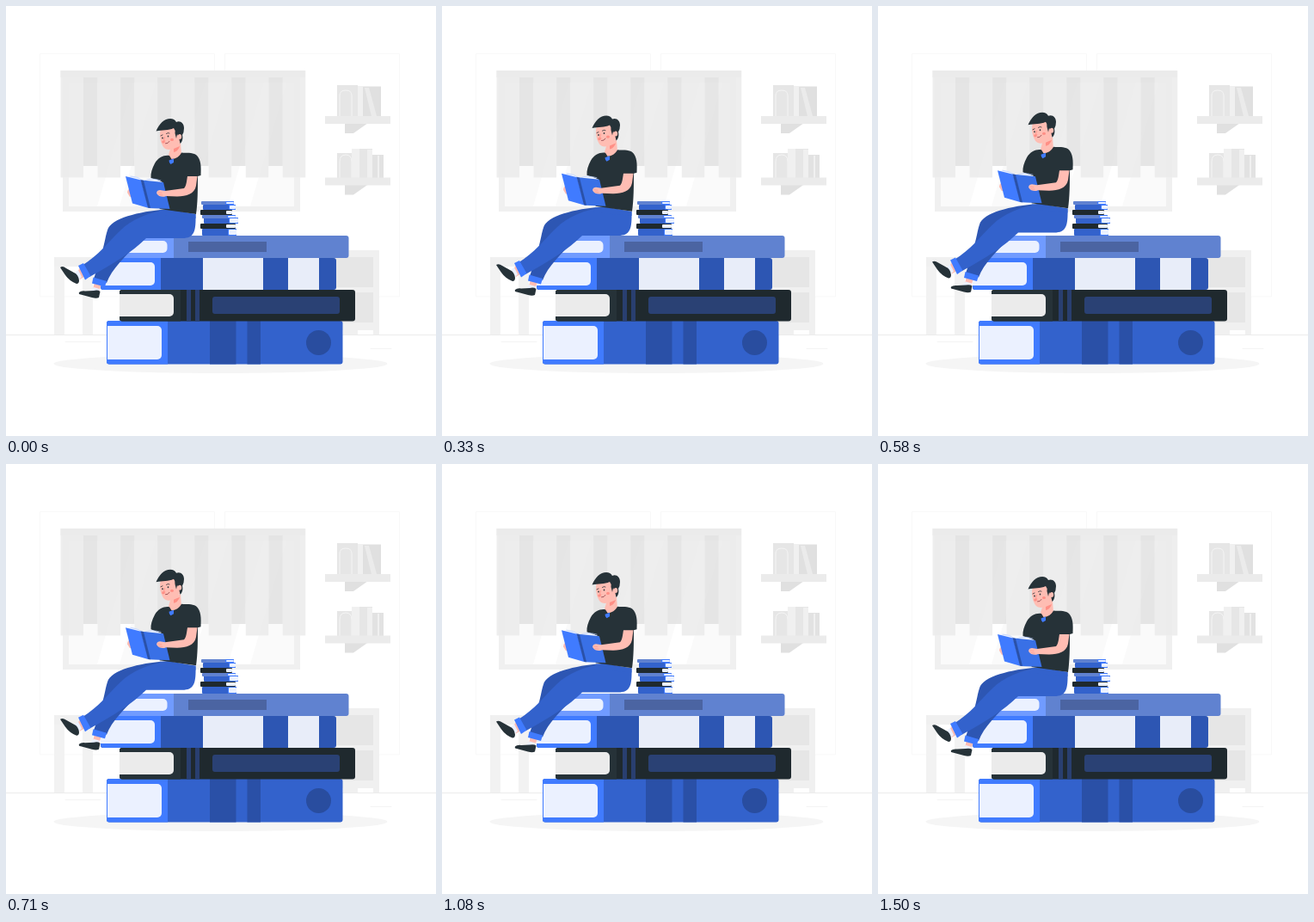
An HTML page with a canvas for the animation above (1.54 s loop, 500 by 500 pixels).

```html
<!DOCTYPE html>
<html lang="en">
<head>
<meta charset="utf-8">
<title>Reading on a stack of books</title>
<style>
html, body { margin: 0; width: 100%; height: 100%; overflow: hidden; background: #fff; }
canvas { display: block; width: 500px; height: 500px; }
</style>
</head>
<body>
<canvas id="stage" width="500" height="500"></canvas>
<script>
const ctx = document.getElementById('stage').getContext('2d');
const LOOP = 1540, STEPS = 37, PEAK = 17.2;
const BLUE = '#407bff', MID = '#3362cc', DARK = '#2d56b3', INK = '#263238';
const PAPER = '#ebf1ff', SKIN = '#ffbdb3', PINK = '#ff8f86';

function rect(color, x1, y1, x2, y2, radius = 0) {
  ctx.fillStyle = color;
  ctx.beginPath();
  ctx.roundRect(x1, y1, x2 - x1, y2 - y1, radius);
  ctx.fill();
}
function shape(color, path) {
  ctx.fillStyle = color;
  ctx.fill(new Path2D(path));
}
function line(color, width, path) {
  ctx.strokeStyle = color;
  ctx.lineWidth = width;
  ctx.lineCap = 'round';
  ctx.stroke(new Path2D(path));
}
function oval(color, x, y, rx, ry = rx) {
  ctx.fillStyle = color;
  ctx.beginPath();
  ctx.ellipse(x, y, rx, ry, 0, 0, 2 * Math.PI);
  ctx.fill();
}
function lifted(dy, draw) {
  ctx.save();
  ctx.translate(0, -dy);
  draw();
  ctx.restore();
}

function drawWindow() {
  rect('#f0f0f0', 66, 83, 342, 239);
  rect('#fafafa', 73, 89, 335, 233);
  for (const x of [106, 190, 258]) {
    shape('#fff', `M${x} 233L${x + 42} 89H${x + 68}L${x + 26} 233Z`);
  }
  ctx.globalAlpha = 0.88;
  for (let i = 0; i < 7; i++) {
    const x = 63.5 + 43.05 * i;
    rect('#ececec', x, 75, x + 26.5, 199.5);
    if (i < 6) rect('#e3e3e3', x + 26.5, 75, x + 43.05, 186);
  }
  ctx.globalAlpha = 1;
  rect('#ebebeb', 63.5, 75, 348, 83);
}

function drawShelf(y) {
  shape('#e0e0e0', `M394 ${y + 8}H421L404 ${y + 20}H394Z`);
  rect('#ebebeb', 371, y, 447, y + 9);
}

function drawRoom() {
  line('#f8f8f8', 1, 'M39.5 337.5V55.5H242.5V337.5ZM254.5 337.5V55.5H457.5V337.5Z');
  drawWindow();

  rect('#e6e6e6', 385, 92, 409, 129);
  line('#f5f5f5', 1, 'M388 128V104Q388 98 395 98T402 104V128');
  rect('#f0f0f0', 409, 93, 415, 129);
  rect('#e0e0e0', 415, 93.5, 436, 129);
  shape('#ebebeb', 'M417 95H422L431 128H425Z');
  drawShelf(128);

  rect('#e6e6e6', 385, 171, 404, 200);
  line('#f5f5f5', 1, 'M388 200V181Q388 173 395 173T402 181V200');
  rect('#f0f0f0', 402, 166, 411, 200);
  rect('#e6e6e6', 411, 166, 426, 200);
  rect('#f0f0f0', 420, 167, 426, 200);
  rect('#e2e2e2', 426, 173, 439, 200);
  rect('#f0f0f0', 432, 174, 434, 200);
  drawShelf(199.5);

  rect('#f0f0f0', 56, 292, 140, 303);
  rect('#f2f2f2', 56, 303, 68, 382);
  rect('#f2f2f2', 89, 303, 101, 382);
  rect('#f0f0f0', 380, 284, 434, 377);
  rect('#e6e6e6', 384, 292, 427, 327);
  rect('#e6e6e6', 384, 333, 427, 368);
  rect('#f0f0f0', 392, 376, 409, 382);
  rect('#f0f0f0', 427, 376, 434, 382);
  line('#ececec', 1, 'M0 382.5H500');
  line('#f4f4f4', 1, 'M424 398.5H448M69 390.5H110');
}

function drawBooks() {
  oval('#f5f5f5', 249.5, 416, 194, 11);

  rect(MID, 117, 366, 391.5, 416.5, 3);
  rect(BLUE, 117, 366, 188, 416.5, [3, 0, 0, 3]);
  rect(PAPER, 118, 372, 181, 411, [0, 5, 5, 0]);
  rect('#2a50a7', 237, 366, 267.5, 416.5);
  rect('#2a50a7', 280.5, 366, 296, 416.5);
  oval('#294d9f', 363.5, 391.5, 14.5);

  rect('#1f292e', 132, 330, 406, 366.5, 3);
  rect(INK, 132, 330, 203, 366.5, [3, 0, 0, 3]);
  rect('#ebebeb', 132, 335, 195, 361, [0, 5, 5, 0]);
  rect('#293f70', 210, 330, 215, 366.5);
  rect('#293f70', 220, 330, 225, 366.5);
  rect('#2a4174', 240, 338, 388, 358, 3);

  rect(DARK, 110, 293, 384, 330, 3);
  rect(BLUE, 110, 293, 180, 330, [3, 0, 0, 3]);
  rect(PAPER, 110, 298, 173, 325, [0, 5, 5, 0]);
  rect('#e8edf9', 229, 293, 299, 330);
  rect('#e8edf9', 328, 293, 364, 330);

  rect('#6082d0', 125, 267, 398.5, 293, 3);
  rect('#709bff', 125, 267, 195, 293, [3, 0, 0, 3]);
  rect(PAPER, 125, 273, 187.5, 287, [0, 5, 5, 0]);
  rect('#4b64a2', 212, 274, 303, 286);
}

// left, top, right, bottom, cover, start of the page block
const SMALL_BOOKS = [
  [228, 259, 268, 267, MID, 259],
  [226, 253, 267, 259, '#1f292e', 256],
  [230, 246, 270, 253, MID, 260],
  [228, 243, 267, 247, '#6082d0', 258],
  [226, 237, 263, 243, '#1f292e', 256],
  [229, 231, 267, 237, MID, 260],
  [227, 227, 265, 231, '#6082d0', 256]
];
function drawSmallBooks() {
  for (const [x1, y1, x2, y2, cover, pages] of SMALL_BOOKS) {
    rect(cover, x1, y1, x2, y2, 1);
    if (cover !== '#1f292e') rect(BLUE, pages - 1, y1, x2, y2, 1);
    rect(PAPER, pages, y1 + 1, x2, y2 - 1, 1);
  }
}

function drawLegs() {
  shape(SKIN, 'M86 305L92 314L86 318L81 311ZM103 321L111 323L108 333H100Z');
  shape(PAPER, 'M80 310L84 307L88 315L85 318ZM98 331L102 327L109 329L108 333Z');
  shape(INK, 'M63 304Q66 302 70 305L79 310Q84 312 85 319Q85 323 82 323Q74 320 69 313Z');
  shape(INK, 'M85 333Q87 331 92 331.500L102 331Q107 330 109.500 332L108 339Q105 340.500 100 339L87 335.500Q84 335 85 333Z');
  shape(DARK, 'M192 236C160 238 127 245 119 258C115 267 115 282 102 317L117 322C123 306 138 291 158 272Z');
  shape(BLUE, 'M101.500 315.500L117 320L115 326.500L100 322.500Z');
  shape(MID, 'M190 236.500L220.500 242C221 262 219 270 205 270H163C147 286 126 299 97 315L88 302C108 290 119 274 133 261C146 248 165 240 190 236.500Z');
  shape(BLUE, 'M84 302L90 299L98.500 314L92 318.500Z');
}

function drawTorso() {
  shape(SKIN, 'M192 163L203 159L204 174L193 181L189 173Z');
  shape(INK, 'M190 174C184 173 177 176 173 183C170 189 168 194 168.500 200L182 205C183 218 180 228 178.500 236L221 242C223 229 223 213 223 198L226.500 197C227 187 227 178 221 173C216 170 210 171 204 170.500C202 175 197 178 192.500 178Z');
  shape(BLUE, 'M189.500 179.500L195 177.500L195 182L191.500 184L190 182Z');
}

function drawReading(p) {
  shape(SKIN, 'M145 212Q141 213 141 217L144 222L149 220Z');
  const top = 198 + p;
  shape(PAPER, `M141 199Q151 ${top - 3} 160 204Q170 ${top - 1} 183 206L178 214L145 208Z`);
  line('#b9cdfa', 0.7, `M145 198Q153 ${top} 160 203.500Q169 ${top + 1} 180 203`);
  shape(BLUE, 'M139 198L157 202.500L166 235L147 229.500Z');
  shape('#3970e6', 'M158 202.500L183 205L190.500 236L166 235Z');
  shape('#2a51a9', 'M156.500 202L160 203L168 235L165 234.500Z');
  shape(SKIN, 'M211 198L222.500 198L221 209C219 219 210 221 199 221.500L186 221C182 223 177 221 176 219C174 217 176 214 179 214L185 215L207 212C210 209 210 203 211 198Z');
  line(PINK, 0.6, 'M177 217L181 217.500M178 219.500L182 220');
}

function drawHead() {
  shape(PINK, 'M195 166L202 163Q200 169 195 170Z');
  shape(SKIN, 'M180 143C178 149 179 158 183 164C186 168 192 168 197 164L202 159L204 148L198 139Z');
  shape(INK, 'M174.500 145.500C178 137 184 131 191 131Q196 131 198 135C203 133 207 137 207 142Q207 147 205 150C206 154 205 158 202.500 160L201 153L199 149L198 154L196.500 148Q197 144 195 142C189 145 182 144 174.500 145.500Z');
  oval(SKIN, 202, 152, 2.2, 3);
  oval(PINK, 183, 158, 1.8, 1.5);
  oval(PINK, 193, 155.5, 2, 1.6);
  oval(INK, 182, 153.5, 0.8, 1);
  oval(INK, 188.5, 151.5, 0.8, 1);
  line(INK, 0.8, 'M180 151L182 150M186.500 148.500Q188.500 147 190 148');
  line(PINK, 0.8, 'M184.500 152.500L183.500 156.500L185 157');
  line('#8c3f47', 0.8, 'M185.500 160Q188.500 160.500 190 157.500');
}

function render(now) {
  const step = Math.floor((now % LOOP) / LOOP * STEPS);
  const rise = (1 + Math.cos(2 * Math.PI * (step - PEAK) / STEPS)) / 2;
  ctx.clearRect(0, 0, 500, 500);
  drawRoom();
  drawBooks();
  drawSmallBooks();
  lifted(7.3 * rise, drawLegs);
  lifted(7.8 * rise, drawTorso);
  // keeps the waist closed over the hem
  lifted(7.3 * rise, () => shape(MID, 'M179 237L220.500 242V247L176 243Z'));
  lifted(7.8 * rise, () => drawReading(rise));
  lifted(8.2 * rise, drawHead);
}

const start = performance.now();
function tick() {
  render(performance.now() - start);
  requestAnimationFrame(tick);
}
tick();
</script>
</body>
</html>
```
